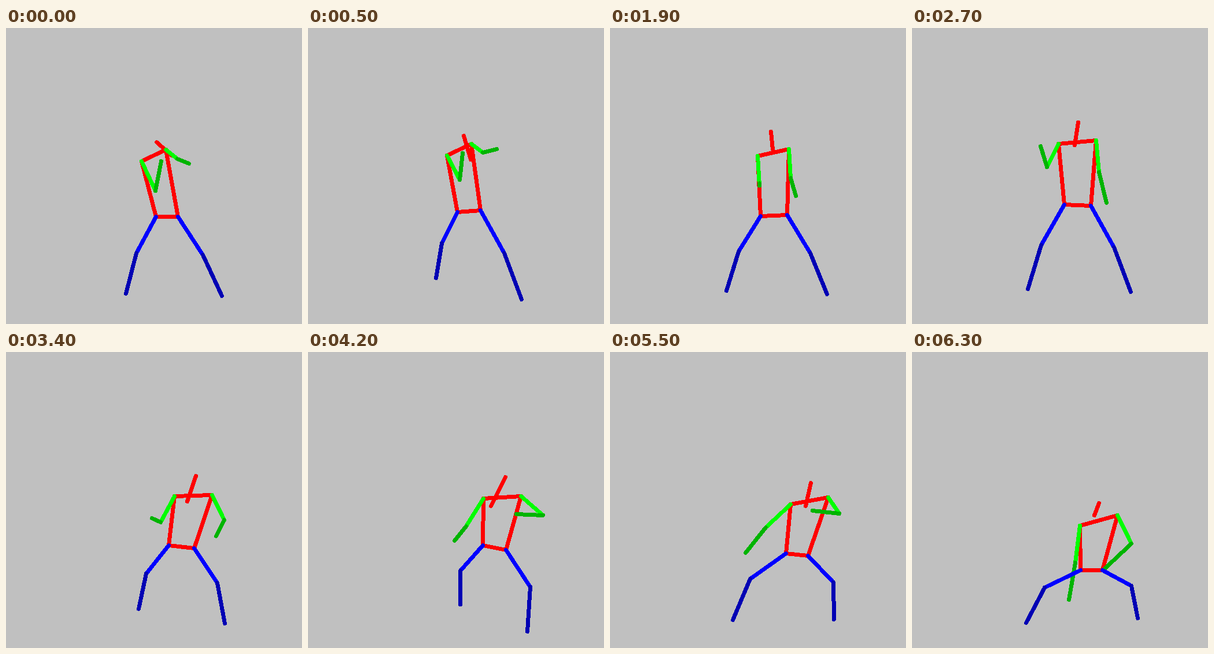
An HTML page for the animation above (6400 ms loop, 512x512 px).

```html
<!DOCTYPE html>
<html lang="en">
<head>
<meta charset="utf-8">
<title>Stick figure</title>
<style>
  html, body { margin: 0; width: 100%; height: 100%; overflow: hidden; background: #c0c0c0; }
  svg { display: block; width: 512px; height: 512px; }
  path { fill: none; stroke-width: 7; stroke-linecap: round; stroke-linejoin: round; }
</style>
</head>
<body>
<svg viewBox="0 0 512 512" shape-rendering="crispEdges"><g id="figure" transform="translate(.5 .5)"></g></svg>
<script>
const LOOP = 6.4, STEP = 0.1;
const RED = '#f00', GREEN = '#0f0', DARK_GREEN = '#00b400', BLUE = '#00f', DARK_BLUE = '#0000b4';
const figure = document.getElementById('figure');

// Moments of the key poses in seconds, and the hop between each pair
const times = [0, 1, 1.9, 2.7, 4.2, 5.5, 6.3];
const hops = [0, -6, -10, 26, -22, 0];

// One "x,y" waypoint per key pose
const route = text => text.split(' ').map(p => p.split(',').map(Number));
const upper = {
  head: route('260,197 278,174 278,179 287,163 341,216 347,226 323,261'),
  neck: route('286,220 275,234 281,210 281,202 316,266 338,266 315,282'),
  chest: route('255,220 267,200 282,215 285,197 335,251 344,257 322,291'),
  elbowL: route('258,281 266,242 258,272 233,240 273,301 269,303 282,364'),
  handL: route('268,230 266,202 258,268 222,204 253,326 234,347 271,428'),
  elbowR: route('296,226 308,203 312,259 323,249 406,282 396,279 379,331'),
  handR: route('316,234 336,184 321,290 336,302 360,280 350,274 331,376')
};
const lower = {
  pelvis: route('278,326 278,307 283,324 286,306 322,338 323,350 310,377'),
  footL: route('207,459 235,404 201,454 200,451 263,436 212,463 197,468'),
  footR: route('373,463 365,474 375,460 378,456 379,483 387,462 390,460')
};

const ease = (t, from, to) => {
  const k = Math.min(1, Math.max(0, (t - from) / (to - from)));
  return k * k * (3 - 2 * k);
};
const add = ([x, y], dx, dy) => [x + dx, y + dy];

// Two joints on either side of a centre
const pair = (p, w, h) => [add(p, -w / 2, -h / 2), add(p, w / 2, h / 2)];

// Knee: the middle of the leg pushed out sideways
function knee(hip, foot, bend) {
  const dx = foot[0] - hip[0], dy = foot[1] - hip[1], len = Math.hypot(dx, dy);
  return [(hip[0] + foot[0]) / 2 + bend * dy / len, (hip[1] + foot[1]) / 2 - bend * dx / len];
}

function pose(t) {
  let i = 0;
  while (i < times.length - 2 && t >= times[i + 1]) i++;
  const k = Math.min(1, (t - times[i]) / (times[i + 1] - times[i]));
  const hop = hops[i] * Math.sin(Math.PI * k);
  const at = r => r[i].map((v, n) => v + (r[i + 1][n] - v) * k);

  const j = {};
  for (const name in upper) j[name] = add(at(upper[name]), Math.abs(hop) * 0.6, hop);
  for (const name in lower) j[name] = at(lower[name]);
  j.pelvis = add(j.pelvis, 0, hop * 0.6);

  [j.shoulderL, j.shoulderR] = pair(j.chest,
    42 + 23 * ease(t, 1, 2.7), -11.5 - 9 * Math.cos(0.9 * (t - 0.2)));
  [j.hipL, j.hipR] = pair(j.pelvis,
    42 + 5 * Math.sin(t - 0.8), 2 - 6 * Math.cos(t - 1.2));

  const crouch = ease(t, 2.7, 4.2);
  j.kneeL = knee(j.hipL, j.footL, -9 - 12 * crouch);
  j.kneeR = knee(j.hipR, j.footR, 6 + 18 * crouch);
  return j;
}

// Bones in painting order
const bones = [
  [RED, 'head', 'neck'],
  [RED, 'shoulderL', 'shoulderR', 'hipR', 'hipL', 'shoulderL'],
  ...['L', 'R'].flatMap(s => [
    [GREEN, 'shoulder' + s, 'elbow' + s],
    [DARK_GREEN, 'elbow' + s, 'hand' + s]
  ]),
  ...['L', 'R'].flatMap(s => [
    [BLUE, 'hip' + s, 'knee' + s],
    [DARK_BLUE, 'knee' + s, 'foot' + s]
  ])
].map(([color, ...joints]) => {
  const path = document.createElementNS(figure.namespaceURI, 'path');
  path.setAttribute('stroke', color);
  figure.append(path);
  return { path, joints };
});

function draw(t) {
  const j = pose(t);
  for (const { path, joints } of bones) {
    path.setAttribute('d', 'M' + joints.map(name => j[name].map(Math.round)).join('L'));
  }
}

const start = performance.now();
function tick() {
  const t = (performance.now() - start) / 1000 % LOOP;
  draw(Math.floor(t / STEP + 1e-6) * STEP);
  requestAnimationFrame(tick);
}
tick();
</script>
</body>
</html>
```
